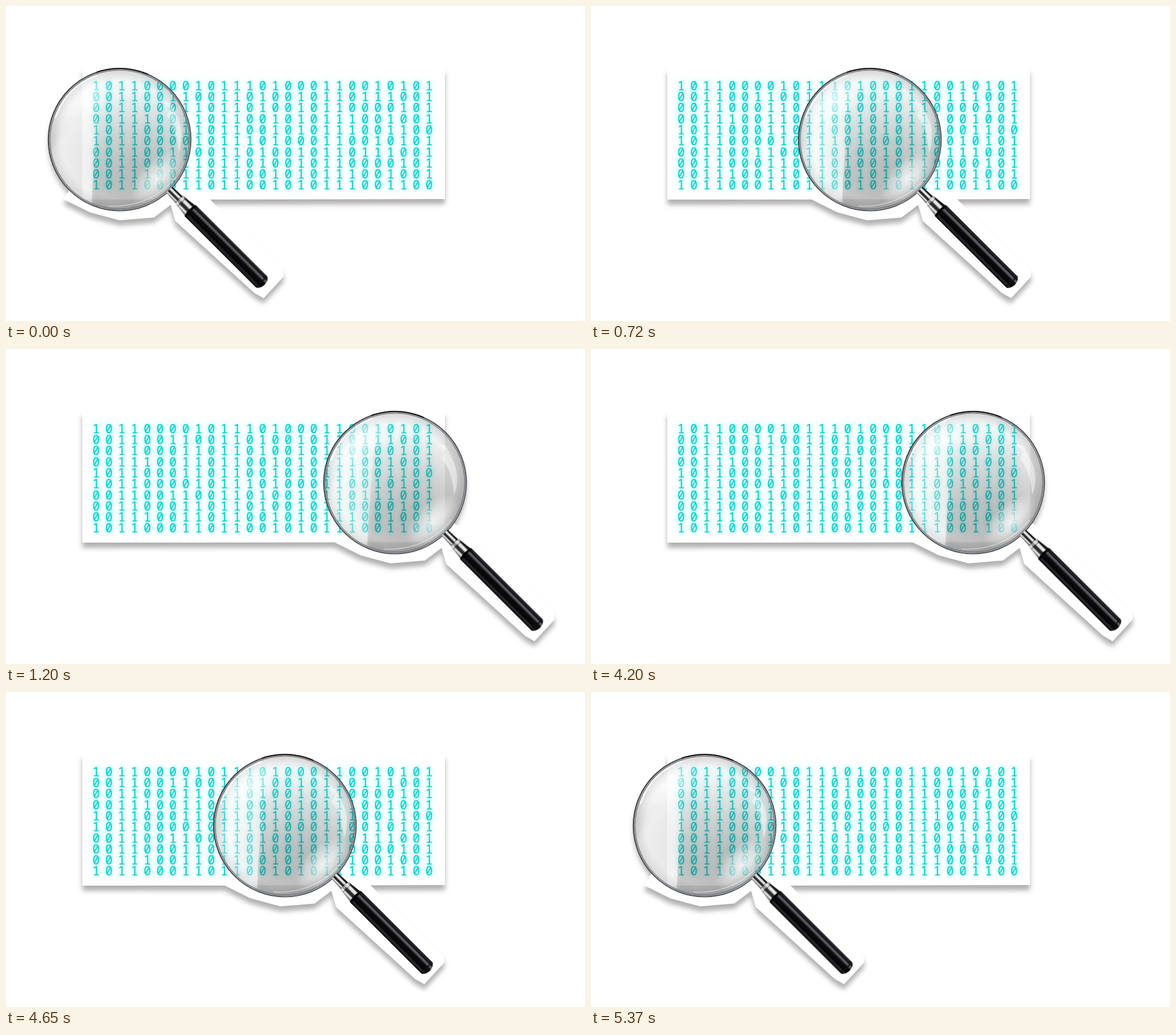
Write an HTML page that moves like this. It is 1009 px wide and 550 px high and loops after 8.37 s.

```html
<!DOCTYPE html>
<html lang="en">
<head>
<meta charset="utf-8">
<title>Magnifier over binary</title>
<style>
html, body { margin: 0; width: 100%; height: 100%; overflow: hidden; background: #fff; }
svg { display: block; width: 1009px; height: 550px; }
#digits { font: 21px "Noto Sans Mono", "DejaVu Sans Mono", monospace; fill: #0ccdc8; stroke: #0ccdc8; stroke-width: .25; text-anchor: middle; }
</style>
</head>
<body>
<svg viewBox="0 0 1009 550">
  <defs>
    <filter id="drop" filterUnits="userSpaceOnUse" x="0" y="0" width="1009" height="550" color-interpolation-filters="sRGB">
      <feDropShadow dx="0" dy="9" stdDeviation="4" flood-color="#000" flood-opacity=".31"/>
    </filter>
    <filter id="glow" filterUnits="userSpaceOnUse" x="120" y="100" width="660" height="250" color-interpolation-filters="sRGB">
      <feDropShadow dx="0" dy="0" stdDeviation="4.2" flood-color="#00f4f4" flood-opacity=".62"/>
    </filter>
    <filter id="soft" x="-50%" y="-50%" width="200%" height="200%"><feGaussianBlur stdDeviation="5"/></filter>
    <clipPath id="disc"><circle r="122"/></clipPath>

    <radialGradient id="shade" gradientUnits="userSpaceOnUse" cx="30" cy="40" r="125">
      <stop offset="0" stop-opacity=".14"/>
      <stop offset=".5" stop-opacity=".09"/>
      <stop offset="1" stop-opacity="0"/>
    </radialGradient>
    <linearGradient id="pane" x1="0" y1="0" x2="0" y2="1">
      <stop offset="0" stop-opacity="0"/>
      <stop offset=".35" stop-opacity=".05"/>
      <stop offset=".75" stop-opacity=".14"/>
      <stop offset="1" stop-opacity=".17"/>
    </linearGradient>
    <radialGradient id="rim">
      <stop offset=".84" stop-opacity="0"/>
      <stop offset="1" stop-opacity=".14"/>
    </radialGradient>
    <radialGradient id="spot">
      <stop offset="0" stop-color="#fff" stop-opacity=".8"/>
      <stop offset=".5" stop-color="#fff" stop-opacity=".45"/>
      <stop offset="1" stop-color="#fff" stop-opacity="0"/>
    </radialGradient>
    <linearGradient id="ring" x1="0" y1="0" x2="1" y2="1">
      <stop offset="0" stop-color="#333"/>
      <stop offset=".5" stop-color="#4a4d52"/>
      <stop offset="1" stop-color="#5c6066"/>
    </linearGradient>
    <linearGradient id="steel" x1="0" y1="0" x2="0" y2="1">
      <stop offset="0" stop-color="#222"/>
      <stop offset=".16" stop-color="#111"/>
      <stop offset=".27" stop-color="#eee"/>
      <stop offset=".42" stop-color="#ddd"/>
      <stop offset=".5" stop-color="#333"/>
      <stop offset=".66" stop-color="#222"/>
      <stop offset=".78" stop-color="#f4f4f4"/>
      <stop offset=".9" stop-color="#999"/>
      <stop offset="1" stop-color="#333"/>
    </linearGradient>
    <linearGradient id="grip" x1="0" y1="0" x2="0" y2="1">
      <stop offset="0" stop-color="#111"/>
      <stop offset=".08" stop-color="#2a2a2e"/>
      <stop offset=".18" stop-color="#0a0a0c"/>
      <stop offset=".26" stop-color="#5c5c62"/>
      <stop offset=".34" stop-color="#55555b"/>
      <stop offset=".44" stop-color="#0c0c0e"/>
      <stop offset=".72" stop-color="#050506"/>
      <stop offset=".84" stop-color="#2c2c30"/>
      <stop offset="1" stop-color="#000"/>
    </linearGradient>
  </defs>

  <rect width="1009" height="550" fill="#fff"/>
  <g filter="url(#drop)" fill="#fff">
    <path d="M133 108H765V337L133 338Z"/>
    <circle class="lens" r="124"/>
    <path id="halo" d="M-106 104L-60 127L-8 141L52 136L81 114L89 142L227 268L243 277L278 239L277 227L166 121L150 105L60 40H-60L-90 80Z"/>
  </g>
  <circle class="lens" r="122" fill-opacity=".08"/>
  <path d="M133 108H765V337L133 338Z" fill="#fff"/>
  <g id="digits" filter="url(#glow)"></g>

  <g class="lens">
    <g clip-path="url(#disc)">
      <circle r="122" fill="#fff" fill-opacity=".12"/>
      <circle r="122" fill-opacity=".03"/>
      <path d="M-32 -95H125V125H-49Q-46 20 -32 -95Z" fill="url(#pane)"/>
      <circle r="122" fill="url(#shade)"/>
      <circle r="122" fill="url(#rim)"/>
      <ellipse cx="-68" cy="-68" rx="72" ry="40" transform="rotate(-45 -68 -68)" fill="url(#spot)"/>
      <ellipse cx="66" cy="68" rx="60" ry="32" transform="rotate(-45 66 68)" fill="url(#spot)"/>
      <path d="M-122 30L-95 -20L-40 -40L-49 125H-80Z" fill="#fff" opacity=".3" filter="url(#soft)"/>
      <path d="M74 -68L89 -54L82 -42L88 -33Q101 -10 103 22Q115 -10 100 -41L88 -64Z" fill="#fff" opacity=".42"/>
      <path d="M-20 116Q55 119 98 65" fill="none" stroke="#fff" stroke-width="1.5" opacity=".45"/>
      <path d="M-112 -38Q-94 -92 -40 -112" fill="none" stroke="#fff" stroke-width="3" opacity=".7"/>
    </g>
    <g fill="none">
      <circle r="122.4" stroke="#a4a8ad" stroke-width="1.8"/>
      <circle r="121.3" stroke="#54575c" stroke-width=".9"/>
      <circle r="124.2" stroke="url(#ring)" stroke-width="2"/>
      <path d="M-40 -117.6A124.2 124.2 0 0 1 50 -113.7" stroke="#151515" stroke-width="2"/>
    </g>
    <g transform="rotate(45) translate(0 .7)">
      <path d="M123 -7.5L148 -8.5V8.5L123 7.5Z" fill="url(#steel)"/>
      <path d="M148 -9.5L174 -12.5V12.5L148 9.5Z" fill="url(#steel)"/>
      <path d="M150 -9V9" stroke="#ddd" stroke-width="5" stroke-dasharray="1.5 1.2"/>
      <path d="M146.5 -8.5V8.5M154 -10V10" stroke="#333" stroke-width=".8"/>
      <path d="M175 -13.7H351Q357 -11 358 0Q357 11 351 13.7H175Q171 0 175 -13.7Z" fill="url(#grip)"/>
      <path d="M176 -13Q172 0 176 13" fill="none" stroke="#000" stroke-width="4"/>
      <path d="M348 -13Q354 0 348 13" fill="none" stroke="#111" stroke-width="2"/>
    </g>
  </g>
</svg>
<script>
const rows = [
  "101100001011101000110010101",
  "001100110011010010110111001",
  "001100011011010010110000101",
  "001110011011001010111001001",
  "101100011011001010111001100"
];
const digits = document.getElementById("digits");
const cols = [...rows[0]].map((_, i) => (157 + i * 22.32).toFixed(1)).join(" ");
for (let i = 0; i < 10; i++) {
  const line = document.createElementNS("http://www.w3.org/2000/svg", "text");
  line.setAttribute("x", cols);
  line.setAttribute("y", 146.9 + i * 19.27);
  line.textContent = rows[i % 5];
  digits.append(line);
}

const TICK = 30, STEPS = 40, LOOP = 8370, BACK = 4200;
const lenses = document.querySelectorAll(".lens");
const halo = document.getElementById("halo");
const move = (el, x) => el.setAttribute("transform", `translate(${x} 233.3)`);

function draw(t) {
  const out = Math.min(STEPS, Math.floor(t / TICK));
  const back = t < BACK ? 0 : Math.min(STEPS, Math.floor((t - BACK) / TICK) + 1);
  const x = 198 + 12 * (out - back);
  // the paper cut-out starts 8px ahead and lets the glass catch up
  const lead = back ? 0 : 8 * (1 - out / STEPS);
  lenses.forEach(el => move(el, x));
  move(halo, x + lead);
}

const start = performance.now();
function frame() {
  draw((performance.now() - start) % LOOP);
  requestAnimationFrame(frame);
}
frame();
</script>
</body>
</html>
```
